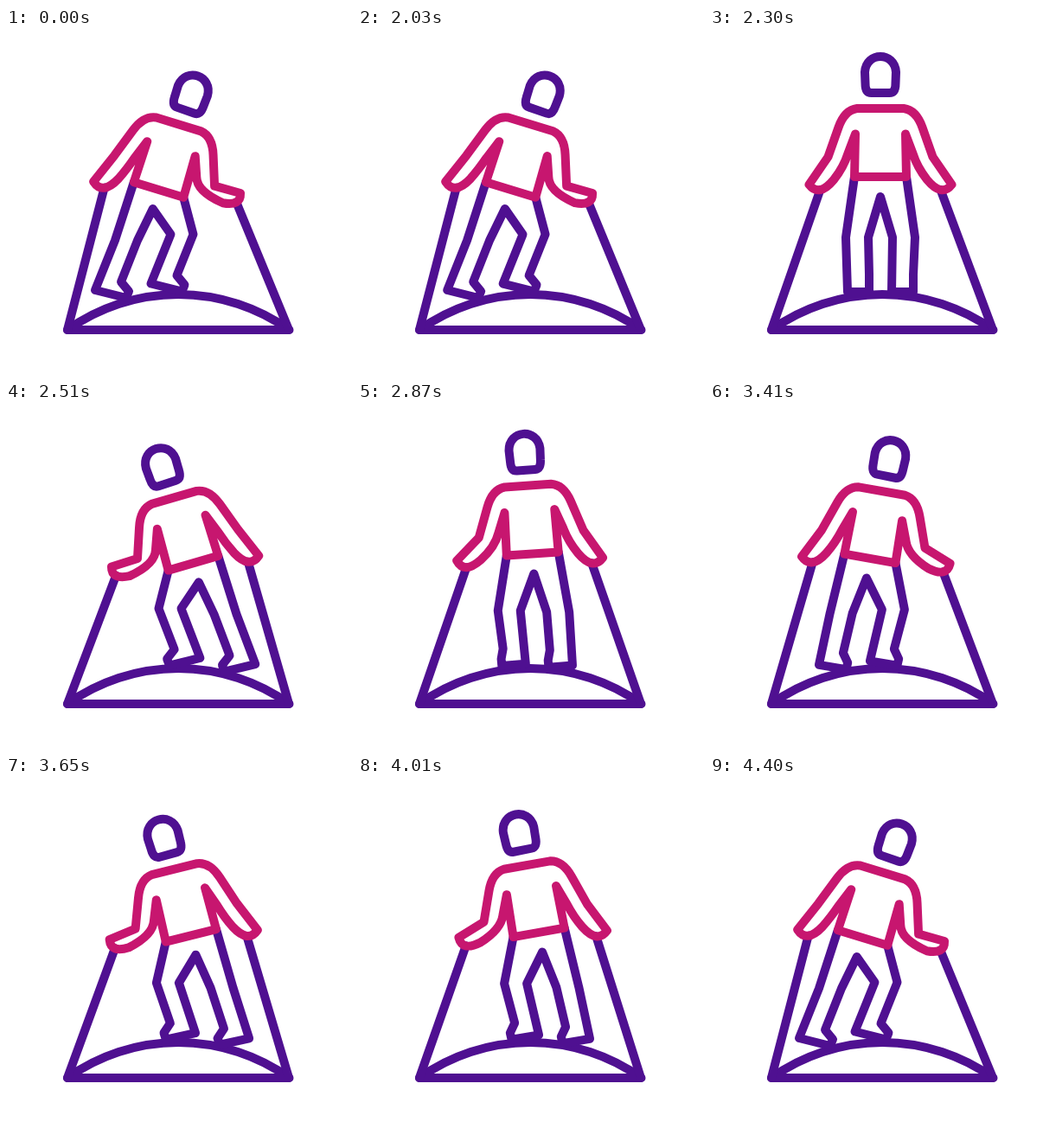
These frames come from a looping animation (400x400 px, 4.46 s). An HTML page:

```html
<!DOCTYPE html>
<html lang="en">
<head>
<meta charset="utf-8">
<style>
  html, body { margin: 0; width: 100%; height: 100%; overflow: hidden; background: #fff; }
  svg { display: block; width: 100vw; height: 100vh; }
  path { fill: none; stroke: #4f1091; stroke-width: 10; stroke-linecap: round; stroke-linejoin: round; }
  #shirt { stroke: #c7166f; }
</style>
</head>
<body>
<svg viewBox="0 0 400 400">
  <path d="M71 349H327.5A221 221 0 0 0 71 349Z"/>
  <path id="ropes"/>
  <path id="legs"/>
  <path id="shirt"/>
  <path id="head"/>
</svg>
<script>
const LOOP = 4460, START = 2000, SWING = 600, SWINGS = 4, STEP = 30;
const AXIS = 197;

// 1 is the resting lean, 0 upright, -1 the opposite lean.
function leanAt(t) {
  const swing = Math.floor((t - START) / STEP) * STEP / SWING;
  if (swing < 0 || swing >= SWINGS) return 1;
  const f = swing % 1, ease = x => 1 - (2 * x) ** 2.5;
  const lean = f < 0.5 ? ease(f) : -ease(1 - f);
  return Math.floor(swing) % 2 ? -lean : lean;
}

// Turns an offset by an angle in degrees and adds it to a joint.
function attach([jx, jy], x, y, angle, scale = 1) {
  const a = angle * Math.PI / 180, c = Math.cos(a) * scale, s = Math.sin(a) * scale;
  return [jx + x * c - y * s, jy + x * s + y * c];
}

// Poses the figure for a lean of 0 to 1; x counts from the axis.
function pose(lean, side) {
  const mix = (a, b) => a + (b - a) * lean;
  const hip = [mix(0, -20.5), mix(172, 187)];
  const torso = (x, y) => attach(hip, x, y, 17 * lean);
  const skull = (x, y) => attach(hip, x, y, 19 * lean);

  // The leading arm folds at the elbow, the trailing one stretches.
  function arm(s) {
    const elbow = torso(60.5 * s, -23);
    const turn = (s < 0 ? 4 : -40) * lean, scale = s < 0 ? 1 : mix(1, 0.8);
    const fore = (x, y) => attach(elbow, x * s, y, turn, scale);
    const [cuff, palm, wrist] = [fore(22, 32), fore(10.5, 47), fore(-6.5, 26.5)];
    return {
      neck: torso(27 * s, -79), collar: torso(41.5 * s, -77), shoulder: torso(48.5 * s, -57),
      elbow, cuff, palm, wrist,
      inner: torso(42.5 * s, -11), upper: torso(37.5 * s, -27),
      armpit: torso(29 * s, -49.5), hem: torso(30 * s, 0),
      grip: cuff.map((v, i) => (v + 2 * palm[i] + wrist[i]) / 4)
    };
  }

  // Knee and foot centres; the toes stretch out in the direction of the lean.
  function leg(kneeX, kneeY, x, y) {
    const half = mix(12.5, 18), tilt = mix(0, 4.5);
    return [
      [kneeX - 13, kneeY], [x - half, y - tilt], [x + half, y + tilt],
      [x + mix(12.5, 21), y - mix(8, 3)], [x + mix(12.5, 12), y - mix(20, 14)],
      [kneeX + 13, kneeY]
    ];
  }

  const l = arm(-1), r = arm(1), shift = 2 * side;
  const back = leg(mix(-27, -58), mix(242, 245.5), mix(-25.5, -76), mix(305, 307.5));
  const front = leg(mix(27, 6.5), mix(242, 238.5), mix(25.5, -11.5), mix(305, 300));
  const jaw = s => [skull(17.5 * s, -108), skull(17.5 * s, -97), skull(10.5 * s, -97)];
  const [jl, jr] = [jaw(-1), jaw(1)];

  return {
    ropes: ['M', [shift - 128, 349], 'L', l.grip, 'M', [shift + 128, 349], 'L', r.grip],
    legs: ['M', l.hem, 'L', ...back, torso(0, 23), ...front, r.hem],
    shirt: [
      'M', l.neck, 'Q', l.collar, l.shoulder, 'L', l.elbow, l.cuff,
      'Q', l.palm, l.wrist, l.inner, l.upper, 'L', l.armpit, l.hem,
      r.hem, r.armpit, r.upper, 'Q', r.inner, r.wrist, r.palm, r.cuff,
      'L', r.elbow, r.shoulder, 'Q', r.collar, r.neck, 'Z'
    ],
    head: [
      'M', skull(-18, -121), 'C', skull(-16.5, -145), skull(16.5, -145), skull(18, -121),
      'L', jr[0], 'Q', jr[1], jr[2], 'L', jl[2], 'Q', jl[1], jl[0], 'Z'
    ]
  };
}

function draw() {
  const lean = leanAt(performance.now() % LOOP), side = lean < 0 ? -1 : 1;
  const write = p => typeof p === 'string' ? p
    : (AXIS + side * p[0]).toFixed(2) + ' ' + p[1].toFixed(2);
  for (const [id, path] of Object.entries(pose(Math.abs(lean), side))) {
    document.getElementById(id).setAttribute('d', path.map(write).join(' '));
  }
  requestAnimationFrame(draw);
}
draw();
</script>
</body>
</html>
```
